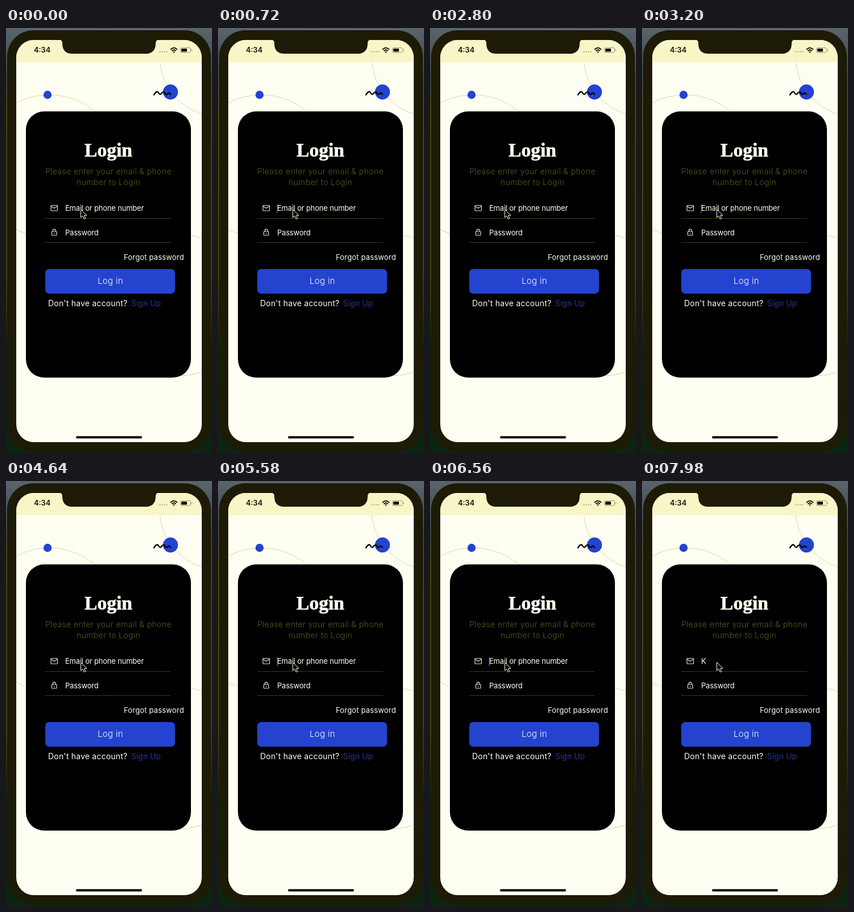
Write an HTML page that moves like this. It is 362 px wide and 744 px high and loops after 8 s.

```html
<!DOCTYPE html>
<html lang="en">
<head>
<meta charset="utf-8">
<title>Login screen</title>
<style>
  html, body { margin: 0; width: 100%; height: 100%; overflow: hidden; background: #1d1a06; }
  svg { display: block; width: 100vw; height: 100vh; }
  text { font-family: Inter, "Open Sans", sans-serif; fill: #fffff0; white-space: pre; }
  .clock { font-size: 12.8px; font-weight: 600; fill: #14140a; }
  .title { font: bold 33.5px "Liberation Serif", serif; stroke: #fffff0; stroke-width: .7; }
  .hint { font-size: 14px; font-weight: 300; letter-spacing: .38px; fill: #5c571f; }
  .field { font-size: 13px; letter-spacing: -.2px; }
  .link { font-size: 13px; letter-spacing: .17px; }
  .button { font-size: 15px; font-weight: 300; letter-spacing: .35px; }
  .account { font-size: 14px; letter-spacing: .2px; }
  .middle { text-anchor: middle; }
  .line { fill: none; stroke-linecap: round; stroke-linejoin: round; }
</style>
</head>
<body>
<svg viewBox="0 0 362 744">
  <defs>
    <linearGradient id="backdrop" x2="0" y2="1">
      <stop offset="0" stop-color="#59646c"/>
      <stop offset=".12" stop-color="#38424a"/>
      <stop offset=".2" stop-color="#4a4510"/>
      <stop offset=".58" stop-color="#453f0c"/>
      <stop offset=".75" stop-color="#10220c"/>
      <stop offset="1" stop-color="#0c2412"/>
    </linearGradient>
    <clipPath id="screen"><rect x="18" y="21" width="326" height="704" rx="31"/></clipPath>
  </defs>

  <!-- Phone -->
  <rect width="362" height="744" fill="url(#backdrop)"/>
  <rect x="2" y="4" width="358" height="737" rx="46" fill="#1d1a06"/>
  <g clip-path="url(#screen)">
    <rect x="18" y="21" width="326" height="704" fill="#fffef3"/>
    <g class="line" stroke="#d9d8a4">
      <circle cx="76" cy="242" r="125"/>
      <circle cx="375" cy="50" r="105"/>
      <circle cx="303" cy="485" r="124"/>
    </g>
    <rect x="18" y="21" width="326" height="39" fill="#f8f6c6"/>
    <path d="M93 20 Q99 21 99 27 Q99 45 117 45 H245 Q263 45 263 27 Q263 21 269 20 Z" fill="#1d1a06"/>
  </g>

  <!-- Status bar -->
  <text class="clock" x="49" y="43">4:34</text>
  <path class="line" d="M270.5 41.5 H285" stroke="#b5b38c" stroke-width="2.4" stroke-dasharray="0 4"/>
  <g class="line" stroke="#14140a" stroke-width="2" stroke-linecap="butt">
    <path d="M289.6 37.2 Q295 32.2 300.4 37.2 M292 39.7 Q295 36.9 298 39.7"/>
    <circle cx="295" cy="42" r=".5"/>
  </g>
  <rect x="306.5" y="34.5" width="18" height="8.5" rx="2.5" fill="none" stroke="#97957a"/>
  <rect x="308" y="36" width="10" height="5.5" rx="1" fill="#14140a"/>
  <path d="M326.5 37.5 V40.5" stroke="#97957a"/>

  <!-- Decoration -->
  <g fill="#2443cf">
    <circle cx="73" cy="117" r="7.2"/>
    <circle cx="289" cy="112" r="13.2"/>
  </g>
  <path class="line" d="M260 117 Q264 110 267 112 Q270 117 272 116 Q276 110 279 113 Q281 118 283 116 Q286 112 289 116"
        stroke="#000" stroke-width="2.4"/>
  <path class="line" d="M125 716.5 H237" stroke="#000" stroke-width="4"/>

  <!-- Login card -->
  <rect x="35" y="146" width="290" height="466" rx="32"/>
  <text class="title middle" x="180" y="225">Login</text>
  <text class="hint middle" x="180" y="256">Please enter your email &amp; phone</text>
  <text class="hint middle" x="180" y="275">number to Login</text>

  <g class="line" stroke="#e4e2c0" stroke-width="1.2">
    <rect x="79" y="310.5" width="11.5" height="9.5" rx="1"/>
    <path d="M79.5 312 L84.7 315.5 L90 312"/>
    <rect x="80.5" y="356" width="8.5" height="7" rx="1"/>
    <path d="M82.3 356 V354.5 a2.4 2.4 0 0 1 4.8 0 V356 M84.7 359 V360.3"/>
  </g>
  <path d="M69 333.5 H290 M69 375.5 H290" stroke="#3b380f"/>
  <text class="field" id="email" x="104" y="320"></text>
  <rect id="caret" y="308" width="1.6" height="16" fill="#3159d6"/>
  <text class="field" x="104" y="363">Password</text>

  <text class="link" x="207" y="406">Forgot password</text>
  <rect x="69" y="422" width="228" height="43" rx="6.5" fill="#2443cf"/>
  <text class="button middle" x="183.5" y="448">Log in</text>
  <text class="account" x="74" y="487">Don't have account?</text>
  <text class="account" x="220" y="487" style="fill:#26338a;letter-spacing:0">Sign Up</text>

  <path d="M131.5 317.5 V332 L135 329 L137.3 334.5 L139.8 333.4 L137.6 328.2 H142 Z"
        fill="#000" stroke="#fffff0" stroke-linejoin="round"/>
</svg>

<script>
const LOOP = 8000;
const FOCUS_STEP = 10;   // the caret first appears here
const TYPED_AT = 7960;
const BLINK = 24, HALF = BLINK / 2, FADE = 4;
const email = document.getElementById('email');
const caret = document.getElementById('caret');

// Time advances in groups of three steps: 20, 20 and 100 ms.
function stepAt(ms) {
  const shifted = ms + 20;
  const inGroup = Math.min(2, Math.floor(shifted % 140 / 20));
  return 3 * Math.floor(shifted / 140) + inGroup - 3;
}

// Each half of the blink starts with a short fade and then holds.
function caretOpacity(step) {
  if (step < FOCUS_STEP) return 0;
  const sinceFocus = step - FOCUS_STEP;
  if (sinceFocus < HALF) return 1;
  const phase = sinceFocus % BLINK;
  const fade = Math.min(1, phase % HALF / FADE);
  return phase < HALF ? fade : 1 - fade;
}

function draw(now) {
  const ms = now % LOOP;
  const typed = ms >= TYPED_AT;
  email.textContent = typed ? 'K' : 'Email or phone number';
  caret.setAttribute('x', typed ? 111.5 : 103.5);
  caret.setAttribute('opacity', caretOpacity(stepAt(ms)));
}

const start = performance.now();
function tick() {
  draw(performance.now() - start);
  requestAnimationFrame(tick);
}
tick();
</script>
</body>
</html>
```
